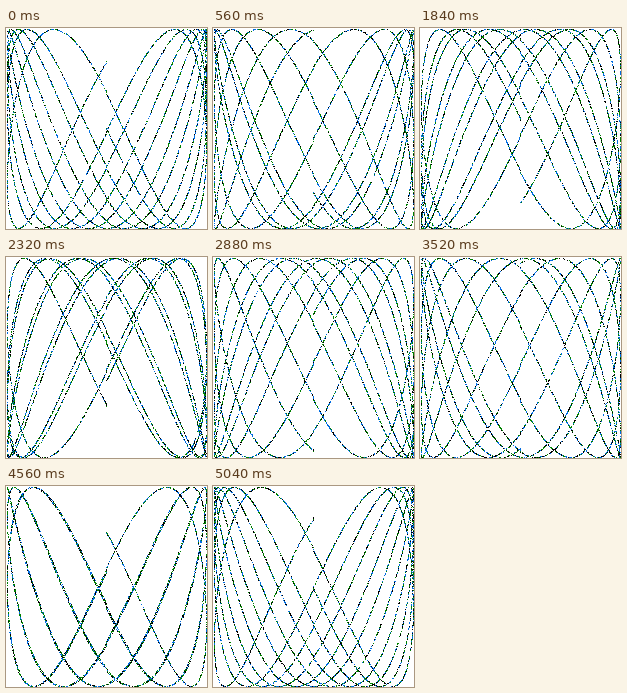
Recreate the animation shown at these times as an HTML page with a canvas. Size 201 px wide and 201 px high, loop 5120 ms.

```html
<!DOCTYPE html>
<html lang="en">
<head>
<meta charset="utf-8">
<title>Lissajous</title>
<style>
  html, body { margin: 0; width: 100%; height: 100%; overflow: hidden; background: #fff; }
  canvas { display: block; width: 201px; height: 201px; image-rendering: pixelated; }
</style>
</head>
<body>
<canvas id="stage" width="201" height="201"></canvas>
<script>
  const R = 100, SIZE = 2 * R + 1;
  const STEPS = 64, STEP_MS = 80, PHASE_STEP = 0.1;
  const CYCLES = 5, RES = 0.001, FREQ = 2.124;

  // Colours as little-endian ABGR: white, black, green, blue
  const WHITE = 0xffffffff;
  const PALETTE = [WHITE, 0xff000000, 0xff008000, 0xffe06c00];

  const ctx = document.getElementById('stage').getContext('2d');
  const image = ctx.createImageData(SIZE, SIZE);
  const pixels = new Uint32Array(image.data.buffer);

  function seededRandom(seed) {
    let s = seed >>> 0;
    return () => {
      s = (s + 0x6d2b79f5) >>> 0;
      let h = Math.imul(s ^ (s >>> 15), s | 1);
      h ^= h + Math.imul(h ^ (h >>> 7), h | 61);
      return ((h ^ (h >>> 14)) >>> 0) / 4294967296;
    };
  }

  const toPixel = v => R + Math.trunc(v * R + 0.5);

  function draw(step) {
    const random = seededRandom(step * 7919 + 17);
    const phase = step * PHASE_STEP;
    pixels.fill(WHITE);
    for (let t = 0; t < CYCLES * 2 * Math.PI; t += RES) {
      const x = toPixel(Math.sin(t));
      const y = toPixel(Math.sin(t * FREQ + phase));
      pixels[y * SIZE + x] = PALETTE[Math.floor(random() * PALETTE.length)];
    }
    ctx.putImageData(image, 0, 0);
  }

  const start = performance.now();
  let shown = -1;

  function tick() {
    const step = Math.floor((performance.now() - start) / STEP_MS) % STEPS;
    if (step !== shown) {
      shown = step;
      draw(step);
    }
    requestAnimationFrame(tick);
  }
  tick();
</script>
</body>
</html>
```
